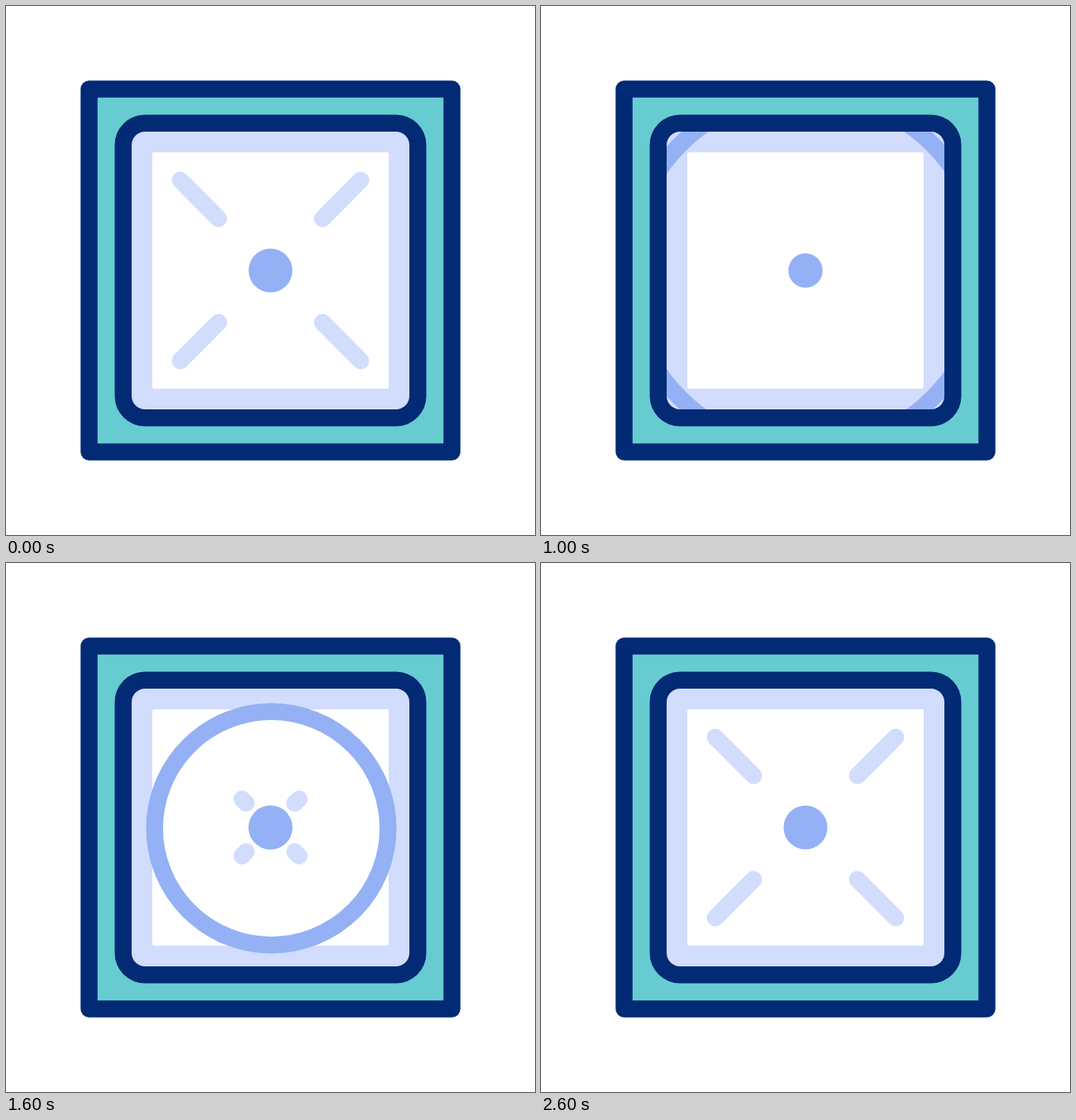
Write an HTML page that moves like this. It is 640 px wide and 640 px high and loops after 3 s.

```html
<!DOCTYPE html>
<html lang="en">
<head>
<meta charset="utf-8">
<title>Shower tray</title>
<style>
  html, body { margin: 0; width: 100%; height: 100%; overflow: hidden; background: #fff; }
  svg { display: block; width: 100vw; height: 100vh; }
</style>
</head>
<body>
<svg viewBox="0 0 640 640" fill="none" stroke-width="20.5" stroke-linecap="round" stroke-linejoin="round">
  <clipPath id="basin"><rect x="142" y="142" width="356" height="356" rx="26"/></clipPath>
  <path d="M100.5 100.5h439v439h-439z" fill="#66ccd1" stroke="#032a75"/>
  <rect x="142" y="142" width="356" height="356" rx="26" fill="#d2dcfd"/>
  <rect x="177" y="177" width="286" height="286" rx="2" fill="#fff"/>
  <path id="jets" stroke="#d2dcfd"/>
  <g id="rings" clip-path="url(#basin)" stroke="#93b1f4">
    <circle cx="321" cy="321"/><circle cx="321" cy="321"/><circle cx="321" cy="321"/>
  </g>
  <circle id="drain" cx="320" cy="320" fill="#93b1f4"/>
  <rect x="141.75" y="141.75" width="356.5" height="356.5" rx="26.5" stroke="#032a75"/>
</svg>
<script>
const LOOP = 3000, STEP = 40;
const CORNER = 170, REST_FAR = 210.8, REST_NEAR = 257.2, END = 292;
const jets = document.getElementById('jets');
const drain = document.getElementById('drain');
const rings = [...document.querySelectorAll('#rings circle')];

const clamp = (x, lo = 0, hi = 1) => Math.min(hi, Math.max(lo, x));
const smooth = u => u * u * (3 - 2 * u);
const easeOut = u => 1 - (1 - u) ** 2;
const tween = (t, t0, t1, a, b, ease = smooth) => a + (b - a) * ease(clamp((t - t0) / (t1 - t0)));

// Outer and inner end of a jet, measured along the diagonal
function jetEnds(t) {
  if (t < 960) return [tween(t, 240, 700, REST_FAR, END), tween(t, 240, 660, REST_NEAR, END)];
  if (t < 1960) return [tween(t, 990, 1700, CORNER, END), tween(t, 1000, 1670, CORNER, END, easeOut)];
  return [tween(t, 2000, 2580, CORNER, REST_FAR), tween(t, 2000, 2560, CORNER, REST_NEAR, easeOut)];
}

function drawJets(t) {
  const [far, near] = jetEnds(t);
  const line = (x, y) => `M${x(far)} ${y(far)}L${x(near)} ${y(near)}`;
  const same = v => v, flip = v => 640 - v;
  jets.setAttribute('d', near - far < 0.05 ? '' :
    line(same, same) + line(flip, same) + line(same, flip) + line(flip, flip));
}

// Rings contract towards the drain and fade near it
function drawRing(ring, i, t) {
  const s = clamp(t - 683 - i * 457, -460, 400);
  const r = Math.max(0, 142.7 - 0.488 * s + 0.00028 * s * s);
  ring.setAttribute('r', r);
  ring.setAttribute('opacity', clamp((r - 39) / 71));
}

// The drain swells, shrinks and recovers each time the jets reach it
function drainRadius(t) {
  const p = t < 1500 ? t : t - 1000;
  if (p < 770) return tween(p, 580, 770, 26.5, 32);
  if (p < 1040) return tween(p, 770, 1040, 32, 20);
  return tween(p, 1040, 1300, 20, 26.5);
}

const start = performance.now();
function draw() {
  const elapsed = Math.max(0, performance.now() - start) % LOOP;
  const t = Math.floor(elapsed / STEP) * STEP;
  drawJets(t);
  rings.forEach((ring, i) => drawRing(ring, i, t));
  drain.setAttribute('r', drainRadius(t));
  requestAnimationFrame(draw);
}
draw();
</script>
</body>
</html>
```
